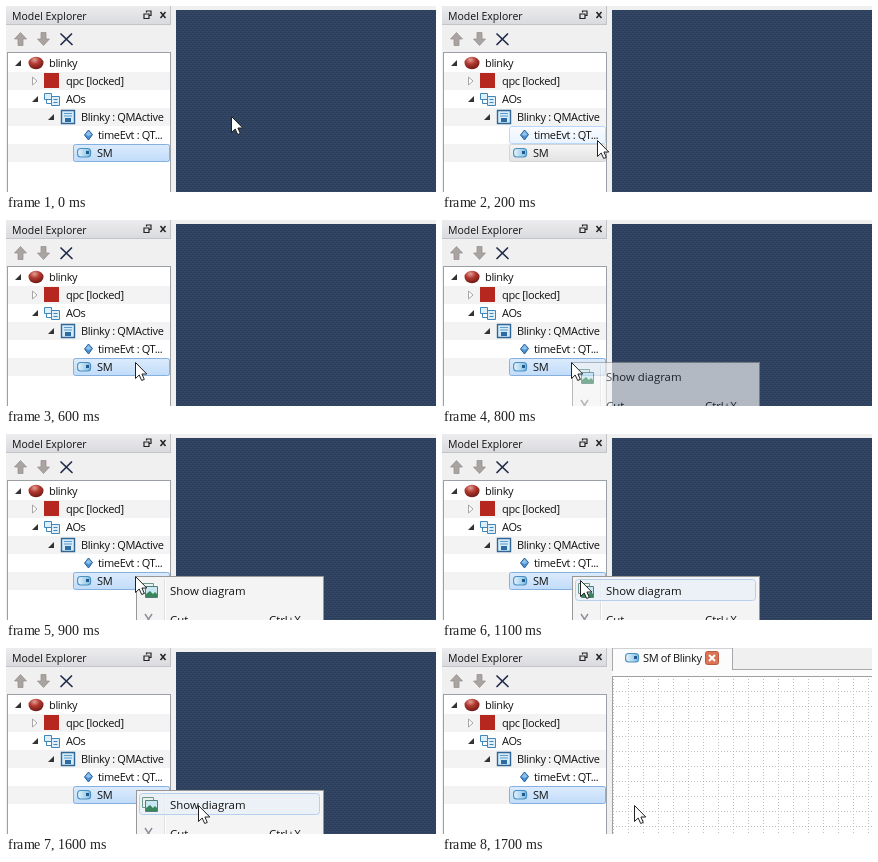
Write an HTML page that moves like this. It is 430 px wide and 186 px high and loops after 4.3 s.

```html
<!DOCTYPE html>
<html lang="en">
<head>
<meta charset="utf-8">
<title>Open a state machine diagram</title>
<style>
  html, body { margin: 0; width: 100%; height: 100%; overflow: hidden; background: #f0f0f0; }
  svg { display: block; }
  text { font: 11px "Open Sans", "Noto Sans", sans-serif; fill: #111; white-space: pre; }
  .title { font-size: 10.5px; }
  .tree text, .tab text { letter-spacing: -.35px; }
  #menu text { font-size: 11.4px; }
  rect { shape-rendering: crispEdges; }
  .round { shape-rendering: auto; }
</style>
</head>
<body>
<svg width="430" height="186" viewBox="0 0 430 186">
  <defs>
    <linearGradient id="bar" x2="0" y2="1"><stop stop-color="#ececee"/><stop offset="1" stop-color="#d9dade"/></linearGradient>
    <linearGradient id="active" x2="0" y2="1"><stop stop-color="#dcebfc"/><stop offset="1" stop-color="#c1dcfa"/></linearGradient>
    <linearGradient id="idle" x2="0" y2="1"><stop stop-color="#f5f5f5"/><stop offset="1" stop-color="#e3e3e3"/></linearGradient>
    <linearGradient id="hover" x2="0" y2="1"><stop stop-color="#fafcff"/><stop offset="1" stop-color="#e9f3fe"/></linearGradient>
    <linearGradient id="glass"><stop stop-color="#e6f5fd"/><stop offset="1" stop-color="#7dbbe2"/></linearGradient>
    <radialGradient id="ball" cx=".4" cy=".25" r=".75"><stop stop-color="#e3a097"/><stop offset=".45" stop-color="#b33a31"/><stop offset="1" stop-color="#701a17"/></radialGradient>
    <pattern id="weave" width="4" height="4" patternUnits="userSpaceOnUse">
      <path fill="#304462" d="M0 0h4v4H0z"/>
      <path fill="#293c59" d="M0 0h2v1H0zM2 2h2v1H2z"/>
      <path fill="#394e6d" d="M1 1h1v1H1zM3 3h1v1H3z"/>
    </pattern>
    <pattern id="grid" x="171" y="28" width="15" height="15" patternUnits="userSpaceOnUse">
      <path stroke="#c0c0c0" stroke-dasharray="1 2" d="M0 .5H15M.5 0V15"/>
    </pattern>
    <g id="state">
      <rect class="round" x=".6" y="1.500" width="13" height="8.500" rx="3" fill="url(#glass)" stroke="#4a8fc0" stroke-width="1.1"/>
      <rect x="9" y="4" width="3" height="3" fill="#22598c"/>
    </g>
    <path id="open" d="M0 6H6V0z" fill="#333"/>
    <path id="arrow" d="M0 -6.500L6 0H2.500V6.500H-2.500V0H-6z" fill="#a9a3a1" stroke="#938b88" stroke-width=".7"/>
  </defs>

  <rect width="430" height="186" fill="#f0f0f0"/>

  <!-- Explorer panel -->
  <rect width="165" height="19" fill="url(#bar)"/>
  <path d="M0 18.500H165M164.500 0V19" stroke="#c3c4c7"/>
  <text class="title" x="6" y="14">Model Explorer</text>
  <path d="M140.500 6.500V5H145V9.500H143.500M138 8H143V12.500H138z" fill="none" stroke="#222" stroke-width="1.2"/>
  <path d="M154.500 6L159.500 12M159.500 6L154.500 12" stroke="#222" stroke-width="1.500"/>
  <use href="#arrow" x="14.500" y="33"/>
  <use href="#arrow" transform="translate(37.500 33) scale(1 -1)"/>
  <path d="M55 28L66 38.500M65.500 28L55 38.500" stroke="#222c4b" stroke-width="1.700" stroke-linecap="round"/>

  <rect x="1" y="46" width="164" height="140" fill="#9b9fa6"/>
  <rect x="2" y="47" width="162" height="139" fill="#fff"/>
  <path d="M2 66H164V84H2zM2 102H164V120H2zM2 138H164V156H2z" fill="#f3f3f3"/>

  <rect id="row" class="round" x="67.500" y="120.500" width="96" height="17" rx="2" fill="url(#hover)" stroke="#b9d7fa"/>
  <rect id="pick" class="round" x="67.500" y="138.500" width="96" height="17" rx="2"/>

  <g class="tree">
    <use href="#open" x="9" y="54"/>
    <path d="M26.500 71L31 75L26.500 79z" fill="#fff" stroke="#a6a6a6"/>
    <use href="#open" x="26" y="90"/>
    <use href="#open" x="42" y="108"/>

    <ellipse cx="30" cy="57" rx="7.500" ry="6.200" fill="url(#ball)"/>
    <rect class="round" x="38" y="67" width="15" height="15" fill="#b5271f"/>
    <path d="M38.500 87.500H45.500V93.500H38.500zM45.500 90.500H53.500V99.500H45.500z" fill="#dceffb" stroke="#4286b8"/>
    <path d="M40.500 94V97.500H45M47.500 93.500H51.500M47.500 96.500H51.500" fill="none" stroke="#4286b8"/>
    <path d="M55.500 104.500H68.500V117.500H55.500z" fill="#d6ebf9" stroke="#2f6696" stroke-width="1.400"/>
    <path d="M58 107.500H66M58 110H66" stroke="#5d9bc8"/>
    <rect x="59" y="112" width="6" height="4" fill="#2d6ca0"/>
    <path d="M82.500 124L86.500 128.500L82.500 134L78.500 129z" fill="#4b91d0" stroke="#285f9b"/>
    <path d="M82.500 125L85.500 128.500L82.500 130L79.500 128.500z" fill="#8cc1ec"/>
    <use href="#state" x="71" y="141"/>

    <text x="43" y="61">blinky</text>
    <text x="60" y="79">qpc [locked]</text>
    <text x="60" y="97">AOs</text>
    <text x="75" y="115">Blinky : QMActive</text>
    <text x="92" y="133">timeEvt : QT...</text>
    <text x="91" y="151">SM</text>
  </g>

  <!-- Work area -->
  <rect id="empty" x="170" y="4" width="260" height="182" fill="url(#weave)"/>
  <g id="diagram" class="tab">
    <rect x="170" y="21" width="260" height="165" fill="#fcfcfc"/>
    <path d="M290 21.500H430" stroke="#a5a8ad"/>
    <path d="M170.500 23V0H290.500V22" fill="#fcfcfc" stroke="#a5a8ad"/>
    <rect x="170" y="28" width="260" height="158" fill="#9da0a5"/>
    <rect x="171" y="29" width="259" height="157" fill="#fff"/>
    <rect x="171" y="29" width="259" height="157" fill="url(#grid)"/>
    <use href="#state" x="183" y="4"/>
    <text x="201" y="14">SM of Blinky</text>
    <rect class="round" x="263.500" y="3.500" width="13" height="13" rx="2" fill="#dc7355" stroke="#b85b40"/>
    <path d="M267 7L273 13M273 7L267 13" stroke="#fff" stroke-width="2"/>
  </g>

  <!-- Context menu -->
  <g id="menu">
    <rect x="130" y="142" width="188" height="50" fill="#979797"/>
    <rect x="131" y="143" width="186" height="50" fill="#f4f4f4"/>
    <path d="M158.500 145V186" stroke="#dedfe0"/>
    <path d="M159.500 145V186" stroke="#fff"/>
    <rect id="item" class="round" x="133.500" y="145.500" width="180" height="21" rx="3" fill="#eaf1f9" fill-opacity=".75" stroke="#b5d0ec"/>
    <path d="M136.500 149.500H147.500V159.500H136.500z" fill="#e7f3ef" stroke="#6f968c"/>
    <path d="M139.500 152.500H151.500V163.500H139.500z" fill="#c9e6f3" stroke="#547d79"/>
    <path d="M140 163V160L144 157L147 160L149 158L151 160V163z" fill="#39865a"/>
    <text x="164" y="161">Show diagram</text>
    <path d="M139 180L145 189M146 180L140 189" stroke="#8c9199" stroke-width="1.500"/>
    <text x="164" y="190">Cut</text>
    <text x="263" y="190">Ctrl+X</text>
  </g>

  <path id="mouse" d="M.5 .5V16.500L4.200 13L6.700 18.500L9.300 17.400L6.900 12H11.800z" fill="#fff" stroke="#222"/>
</svg>
<script>
  const LOOP = 4300, STEP = 100;
  // Pointer stops: time, x, y
  const path = [
    [0, 225, 110], [200, 155, 134], [600, 129, 142], [1000, 129, 142],
    [1100, 138, 146], [1200, 162, 151], [1300, 183, 155], [1400, 192, 157], [LOOP, 192, 157]
  ];
  const $ = id => document.getElementById(id);
  const show = (id, on) => $(id).style.opacity = Number(on);
  const within = (t, from, to) => t >= from && t < to;

  function pointer(t) {
    const i = path.findIndex(p => p[0] > t);
    const [t0, x0, y0] = path[i - 1], [t1, x1, y1] = path[i];
    const k = (t - t0) / (t1 - t0);
    return [x0 + (x1 - x0) * k, y0 + (y1 - y0) * k].map(Math.round);
  }

  function draw(t) {
    const idle = within(t, 100, 400);
    $("pick").setAttribute("fill", idle ? "url(#idle)" : "url(#active)");
    $("pick").setAttribute("stroke", idle ? "#d4d4d4" : "#86b0df");
    show("row", within(t, 200, 400));
    show("menu", within(t, 700, 1700) ? Math.min(1, (t - 600) / 300) : 0);
    show("item", t >= 1100);
    show("empty", t < 1700);
    show("diagram", t >= 1700);
    $("mouse").setAttribute("transform", `translate(${pointer(t)})`);
  }

  const start = performance.now();
  function tick() {
    const t = (performance.now() - start) % LOOP;
    draw(Math.floor(t / STEP) * STEP);
    requestAnimationFrame(tick);
  }
  tick();
</script>
</body>
</html>
```
